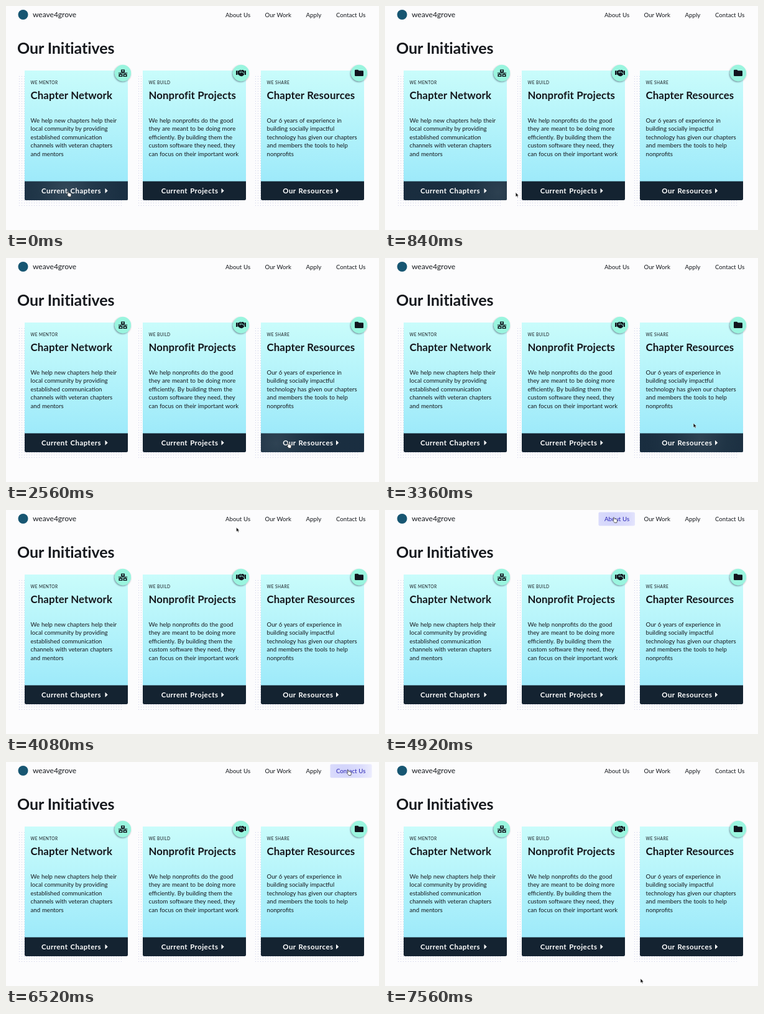
These frames come from a looping animation (600 by 361 pixels, 7.6 s). An HTML page:

```html
<!DOCTYPE html>
<html lang="en">
<head>
<meta charset="utf-8">
<title>Our Initiatives</title>
<style>
  html, body { margin: 0; width: 100%; height: 100%; overflow: hidden; background: #fcfcfd; }
  svg { display: block; width: 100vw; height: 100vh; }
  text { font-family: Lato, "Open Sans", sans-serif; fill: #14171c; white-space: pre; }
  .brand { font-size: 12px; }
  .nav { font-size: 9.7px; word-spacing: .3px; }
  .heading { font-size: 25px; font-weight: 700; letter-spacing: -.08px; }
  .label { font-size: 6.6px; letter-spacing: .4px; }
  .title { font-size: 16.8px; font-weight: 700; letter-spacing: .14px; }
  .body { font-size: 9.6px; word-spacing: .4px; }
  .action { font-size: 11.4px; font-weight: 700; letter-spacing: .5px; word-spacing: .8px; fill: #fff; }
</style>
</head>
<body>
<svg id="stage" viewBox="0 0 600 361">
  <defs>
    <linearGradient id="sky" x1="0" y1="0" x2="0" y2="1">
      <stop offset="0" stop-color="#c9fcfb"/>
      <stop offset="1" stop-color="#9eeafa"/>
    </linearGradient>
    <pattern id="dots" width="4" height="4" patternUnits="userSpaceOnUse">
      <circle cx="1.5" cy="1.5" r=".6" fill="#c6c8e4"/>
    </pattern>
    <filter id="shadow" x="-40%" y="-40%" width="180%" height="180%">
      <feDropShadow dx="-.8" dy="1.2" stdDeviation="1" flood-color="#234" flood-opacity=".55"/>
    </filter>
    <g id="network" fill="#10151d">
      <path fill-rule="evenodd" d="M-3-5.6h6v4.6h-6zM-1.4-4.2v1.8h2.8v-1.8z
        M-6.6 1.5h6v4.6h-6zM-5 2.9v1.8h2.8V2.9z
        M.6 1.5h6v4.6h-6zM2.2 2.9v1.8H5V2.9z"/>
      <path d="M-7.2-.5H7.2V.6H-7.2zM-.6-1.2h1.2v1H-.6zM-4.2.4h1.2v1.3h-1.2zM3 .4h1.2v1.3H3z"/>
    </g>
    <g id="handshake" fill="#10151d">
      <path d="M-8-3.7h2v6.6h-2zM6-3.7h2v6.6H6z"/>
      <path d="M-5.5-3.7h2.1L-1.7-5h2.6L-2.6-1.5Q-2.4.5-.4-.2L1.4-1.6 5.1 1.6Q5.6 3 4.3 3.3
        Q4 4.6 2.6 4.4Q1.5 5.9 0 5Q-1.4 5.3-2.2 4.3L-4.6 2.4h-.9z"/>
      <path d="M1.6-5h1.8L5-3.7h.5v4.8L1.7-2.5-.9-.9Q-2 -.9-1.7-1.8z"/>
    </g>
    <path id="folder" fill="#10151d" d="M-7-4q0-1.2 1.2-1.2h4L-.3-3.7h6.1Q7-3.7 7-2.5v6.2Q7 5 5.8 5h-11.6Q-7 5-7 3.7z"/>
  </defs>
  <rect width="600" height="361" fill="#fcfcfd"/>
  <circle cx="27.5" cy="14" r="8" fill="#175672"/>
  <text class="brand" x="43" y="18">weave4grove</text>
  <text class="heading" x="18" y="77">Our Initiatives</text>
  <g id="cards"></g>
  <g id="menu"></g>
  <path id="arrow" d="M0 0V7.1L1.7 5.6 2.8 8.1 4 7.6 2.9 5.2H5z" fill="#111" stroke="#fff" stroke-width=".5"/>
  <path id="hand" d="M.1.8Q.9-.3 1.7.8L2.3 3Q3.1 2.4 3.7 3.1Q4.5 2.7 5 3.5Q6 3.2 6.2 4.3L6.4 6.1 5.7 9H2.3Q1.2 7.2-.5 5.7Q-.5 4.7.9 5.2z"
    fill="#fff" stroke="#222" stroke-width=".7" stroke-linejoin="round"/>
</svg>
<script>
const LOOP = 7600, STEP = 40, FADE = 320, LAG = 120;
const byId = id => document.getElementById(id);

function add(parent, tag, attrs, content) {
  const node = document.createElementNS("http://www.w3.org/2000/svg", tag);
  for (const key in attrs) node.setAttribute(key, attrs[key]);
  if (content) node.textContent = content;
  return parent.appendChild(node);
}

// Pointer path: time, x, y
const path = [
  [0, 98.5, 298.5], [500, 140, 299], [950, 235, 301], [1300, 312, 303],
  [1680, 346.5, 303], [2100, 385, 301], [2560, 452.5, 297.5], [2950, 505, 296],
  [3300, 503, 282], [3700, 435, 135], [4080, 370.5, 28], [4500, 363, 14],
  [5200, 372, 11], [5520, 382, 9], [5680, 418, 8], [5900, 465, 9], [6120, 518, 10],
  [6520, 549, 12.5], [6900, 553, 16], [7050, 525, 85], [7240, 440, 220],
  [7380, 400, 270], [7470, 398, 318], [7560, 411, 349]
];

function slope(i, axis) {
  if (i === 0 || i === path.length - 1) return 0;
  const [a, b] = [path[i - 1], path[i + 1]];
  return (b[axis] - a[axis]) / (b[0] - a[0]);
}

function pointer(t) {
  let i = path.findIndex(p => p[0] > t) - 1;
  if (i < 0) return path[path.length - 1].slice(1);
  const span = path[i + 1][0] - path[i][0], u = (t - path[i][0]) / span;
  return [1, 2].map(axis => {
    const a = path[i][axis], b = path[i + 1][axis], ease = u * u * (3 - 2 * u);
    return a + (b - a) * ease
      + span * u * (1 - u) * ((1 - u) * slope(i, axis) - u * slope(i + 1, axis));
  });
}

const zones = [];

// A box lit by a soft light that trails the pointer
function addZone(parent, box, colors, radius, corner) {
  const id = "light" + zones.length;
  const light = add(parent, "radialGradient", { id, gradientUnits: "userSpaceOnUse", r: radius });
  colors.forEach((color, i) => add(light, "stop", { offset: i / (colors.length - 1), "stop-color": color }));
  const [x, y, width, height] = box;
  const glow = add(parent, "rect", { x, y, width, height, rx: corner, fill: `url(#${id})` });
  const zone = { box, light, glow };
  zones.push(zone);
  return zone;
}

const inside = ([x, y, w, h], [px, py]) => px >= x && px <= x + w && py >= y && py <= y + h;

const cards = [
  { label: "WE MENTOR", title: "Chapter Network", icon: "network", action: "Current Chapters", at: 27, caret: 129.5,
    lines: ["We help new chapters help their", "local community by providing",
      "established communication", "channels with veteran chapters", "and mentors"] },
  { label: "WE BUILD", title: "Nonprofit Projects", icon: "handshake", action: "Current Projects", at: 29.7, caret: 126.5,
    lines: ["We help nonprofits do the good", "they are meant to be doing more",
      "efficiently. By building them the", "custom software they need, they", "can focus on their important work"] },
  { label: "WE SHARE", title: "Chapter Resources", icon: "folder", action: "Our Resources", at: 35.3, caret: 121,
    lines: ["Our 6 years of experience in", "building socially impactful",
      "technology has given our chapters", "and members the tools to help", "nonprofits"] }
];

cards.forEach((card, i) => {
  const x = 30 + i * 190, g = byId("cards");
  const write = (cls, dx, y, content) => add(g, "text", { class: cls, x: x + dx, y }, content);
  add(g, "rect", { x: x - 10, y: 112, width: 167, height: 210, fill: "url(#dots)" });
  add(g, "rect", { x, y: 270, width: 166, height: 43, rx: 2.5, fill: "#142331" });
  addZone(g, [x, 282, 166, 31], ["#34495a", "#22384a", "#1b3043"], 85, 2.5);
  add(g, "rect", { x, y: 104, width: 166, height: 178.5, fill: "url(#sky)" });
  write("label", 9.6, 125.7, card.label);
  write("title", 9.4, 150, card.title);
  card.lines.forEach((line, n) => write("body", 9.6, 188 + n * 13.4, line));
  write("action", card.at, 301.7, card.action);
  add(g, "path", { d: `M${x + card.caret} 293.8l4.2 4-4.2 4z`, fill: "#fff" });
  add(g, "circle", { cx: x + 158, cy: 108, r: 13.2, fill: "#9af5df", filter: "url(#shadow)" });
  add(g, "use", { href: "#" + card.icon, transform: `translate(${x + 158} 108)` });
});

[["About Us", 353, 39.5], ["Our Work", 416.5, 42.5], ["Apply", 482.5, 25], ["Contact Us", 531, 48]]
  .forEach(([name, x, width]) => {
    const g = byId("menu");
    const zone = addZone(g, [x - 9.5, 3.5, width + 19, 22], ["#d2d4fb", "#dcddfc", "#f6f6fe"], 58, 2);
    zone.label = add(g, "text", { class: "nav", x, y: 17.8 }, name);
  });

for (const zone of zones) {
  for (let t = 0; t < LOOP; t += 10) {
    if (!inside(zone.box, pointer(t))) continue;
    zone.enter ??= t || -FADE;
    zone.leave = t;
  }
}

const clamp = (v, low, high) => Math.min(high, Math.max(low, v));

function draw(t) {
  const spot = pointer(t);
  let hovering = false;
  for (const { box, light, glow, label, enter, leave } of zones) {
    const over = inside(box, spot);
    hovering ||= over;
    const rise = clamp((t - enter) / FADE, 0, 1), fall = clamp((t - leave) / FADE, 0, 1);
    const [lx, ly] = pointer(clamp(t - LAG, Math.max(enter, 0), leave));
    light.setAttribute("cx", lx);
    light.setAttribute("cy", ly);
    glow.setAttribute("opacity", rise * (1 - fall));
    if (label) label.style.fill = over ? "#2a25b4" : "";
  }
  for (const id of ["arrow", "hand"]) {
    byId(id).setAttribute("transform", `translate(${spot[0]} ${spot[1]})`);
    byId(id).setAttribute("visibility", (id === "hand") === hovering ? "visible" : "hidden");
  }
}

function tick() {
  draw(Math.floor((performance.now() % LOOP) / STEP) * STEP);
  requestAnimationFrame(tick);
}
tick();
</script>
</body>
</html>
```
